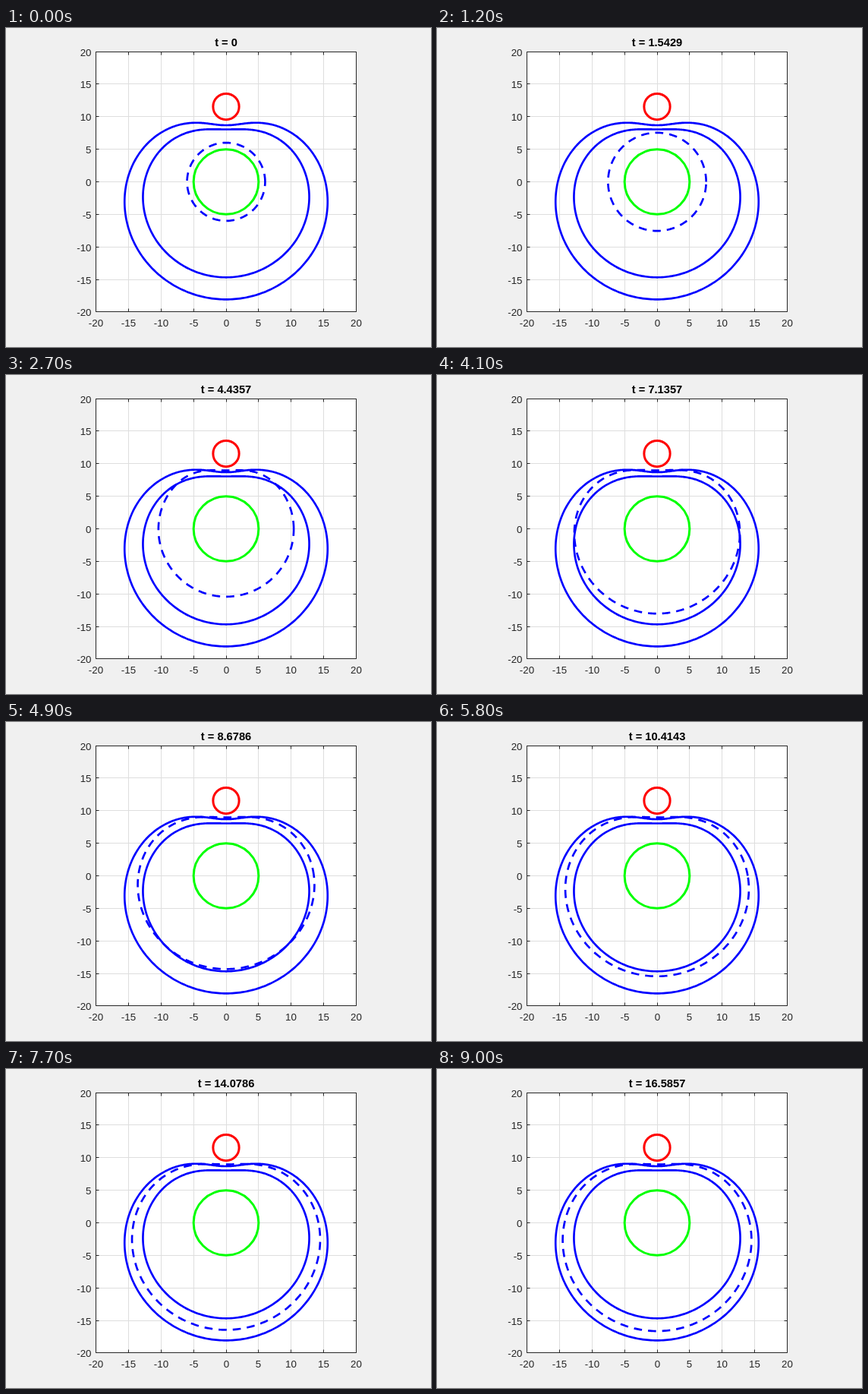
An HTML page with a canvas for the animation above (9100 ms loop, 560 by 420 pixels).

```html
<!DOCTYPE html>
<html>
<head>
<meta charset="utf-8">
<style>
  html, body { margin: 0; width: 100%; height: 100%; overflow: hidden; background: #f0f0f0; }
  canvas { display: block; }
</style>
</head>
<body>
<canvas id="stage" width="560" height="420"></canvas>
<script>
const ctx = document.getElementById('stage').getContext('2d');
const CX = 290, CY = 202.5, SCALE = 8.57;
const LEFT = 118.5, TOP = 31.5, WIDTH = 343, HEIGHT = 342;
const FONT = '"Liberation Sans", Arial, sans-serif';
const INK = '#262626', BLUE = '#00f';
const RED_Y = 11.55;
const LOOP = 9100, HOLD = 500, STEP = 100, DT = 2.7 / 14, LAST = 86;
const N = 360;
const angles = Array.from({ length: N + 1 }, (_, i) => i * 2 * Math.PI / N);

// Radii solving r^2 = c + m d - e / d, d being the distance to the red centre
function oval(c, m, e) {
  return angles.map(th => {
    let r = 10;
    for (let i = 0; i < 60; i++) {
      const d = Math.hypot(r * Math.cos(th), r * Math.sin(th) - RED_Y);
      r = (r + Math.sqrt(c + m * d - e / d)) / 2;
    }
    return r;
  });
}
const inner = oval(52.28, 6.27, 33);
const outer = oval(65.9, 8.85, 45);
const limit = oval(60.45, 7.77, 0);

// Closed form of r' = tanh(k (limit - r)), starting at r = 6
function front(t) {
  return limit.map((end, i) => {
    const k = 1.42 / (outer[i] - inner[i]);
    return end - Math.asinh(Math.sinh(k * (end - 6)) * Math.exp(-k * t)) / k;
  });
}

function stroke(color, width, dash = []) {
  ctx.strokeStyle = color;
  ctx.lineWidth = width;
  ctx.setLineDash(dash);
  ctx.stroke();
}

function polar(radii, dash) {
  ctx.beginPath();
  radii.forEach((r, i) =>
    ctx.lineTo(CX + SCALE * r * Math.cos(angles[i]), CY - SCALE * r * Math.sin(angles[i])));
  stroke(BLUE, 2.67, dash);
}

function circle(y, r, color) {
  ctx.beginPath();
  ctx.arc(CX, CY - y * SCALE, r * SCALE, 0, 2 * Math.PI);
  stroke(color, 3);
}

function lines(list, color) {
  ctx.beginPath();
  for (const [x, y, dx, dy] of list) {
    ctx.moveTo(x, y);
    ctx.lineTo(x + dx, y + dy);
  }
  stroke(color, 1);
}

function text(s, x, y, align, font, color) {
  ctx.font = font + ' ' + FONT;
  ctx.textAlign = align;
  ctx.fillStyle = color;
  ctx.fillText(s, x, y);
}

function axes() {
  const right = LEFT + WIDTH, bottom = TOP + HEIGHT, grid = [], ticks = [];
  ctx.fillStyle = '#fff';
  ctx.fillRect(LEFT, TOP, WIDTH, HEIGHT);
  for (let v = -20; v <= 20; v += 5) {
    const x = Math.floor(CX + v * SCALE) + 0.5, y = Math.floor(CY - v * SCALE) + 0.5;
    grid.push([x, TOP, 0, HEIGHT], [LEFT, y, WIDTH, 0]);
    ticks.push([x, TOP, 0, 4], [x, bottom, 0, -4], [LEFT, y, 4, 0], [right, y, -4, 0]);
    text(v, x, 393, 'center', '13.33px', INK);
    text(v, 112.5, y + 5.5, 'right', '13.33px', INK);
  }
  lines(grid, '#dedede');
  lines(ticks, INK);
  ctx.beginPath();
  ctx.rect(LEFT, TOP, WIDTH, HEIGHT);
  stroke(INK, 1);
}

// At least five significant digits, at most four decimals above one
function label(t) {
  const digits = t ? Math.max(5, Math.floor(Math.log10(t)) + 5) : 5;
  return 't = ' + Number(t.toPrecision(digits));
}

function draw(ms) {
  const step = ms < HOLD ? 0 : Math.min(LAST, Math.floor((ms - HOLD) / STEP) + 1);
  const t = step * DT;
  ctx.fillStyle = '#f0f0f0';
  ctx.fillRect(0, 0, 560, 420);
  axes();
  text(label(t), CX, 24, 'center', 'bold 14.67px', '#000');
  circle(RED_Y, 2, '#f00');
  circle(0, 5, '#0f0');
  polar(inner);
  polar(outer);
  polar(front(t), [10.67, 8]);
}

ctx.lineJoin = 'round';
const start = performance.now();
function tick() {
  draw((performance.now() - start) % LOOP);
  requestAnimationFrame(tick);
}
tick();
</script>
</body>
</html>
```
